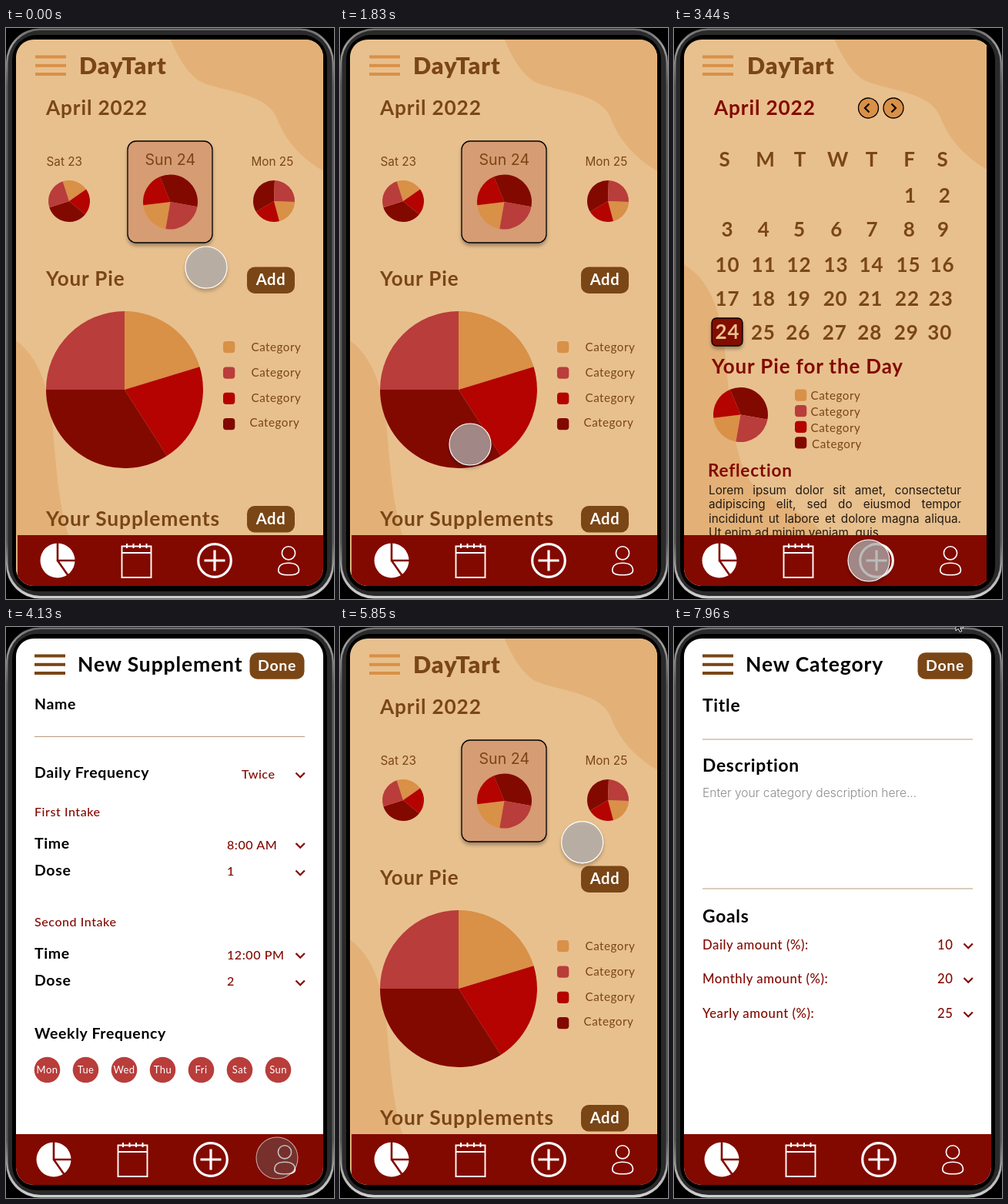
These frames come from a looping animation (426 by 742 pixels, 8000 ms). An HTML page:

```html
<!DOCTYPE html>
<html lang="en">
<head>
<meta charset="utf-8">
<title>Phone prototype</title>
<style>
html, body { margin: 0; width: 100%; height: 100%; overflow: hidden; background: #000; }
svg { display: block; width: 100vw; height: 100vh; }
text { font-family: Nunito, Lato, "Open Sans", sans-serif; letter-spacing: .033em; white-space: pre; }
text.plain, .lorem { font-family: Inter, Roboto, sans-serif; letter-spacing: 0; }
.lorem { font-size: 15.3px; line-height: 18.6px; color: #221a12; white-space: nowrap; }
.lorem div { text-align: justify; text-align-last: justify; }
.lorem div:last-child { text-align-last: left; }
</style>
</head>
<body>
<svg id="stage" viewBox="0 0 426 742" xmlns="http://www.w3.org/2000/svg"></svg>
<script>
const TAN = '#e8c08e', SAND = '#e3b177', CLAY = '#d69c73', BROWN = '#7a4616';
const ORANGE = '#d99047', ROSE = '#b93d3a', RED = '#b40300', DARK = '#820900';
const LOOP = 8000, SCROLL = 318;

const attrs = o => Object.entries(o).map(([k, v]) => `${k}="${v}"`).join(' ');
const rect = (x, y, width, height, fill, rx = 0, more = {}) =>
  `<rect ${attrs({ x, y, width, height, fill, rx, ...more })}/>`;
const circle = (cx, cy, r, fill, more = {}) => `<circle ${attrs({ cx, cy, r, fill, ...more })}/>`;
const line = (d, stroke, width, more = {}) =>
  `<path ${attrs({ d, fill: 'none', stroke, 'stroke-width': width, ...more })}/>`;
const group = (dx, dy, body) => `<g transform="translate(${dx} ${dy})">${body}</g>`;
const text = (x, y, s, size, fill, weight = 700, more = {}) =>
  `<text ${attrs({ x, y, 'font-size': size, fill, 'font-weight': weight, ...more })}>${s}</text>`;
const plain = (x, y, s, size, fill, weight = 400) => text(x, y, s, size, fill, weight, { class: 'plain' });
const centred = (x, y, s, size, fill, weight) => text(x, y, s, size, fill, weight, { 'text-anchor': 'middle' });

// Slices as [colour, end angle], clockwise from the top.
const SLICES = [[ORANGE, 73], [RED, 147.4], [DARK, 270], [ROSE, 360]];
function pie(cx, cy, r, turn = 0) {
  const at = deg => {
    const a = (deg + turn) * Math.PI / 180;
    return `${(cx + r * Math.sin(a)).toFixed(2)} ${(cy - r * Math.cos(a)).toFixed(2)}`;
  };
  let from = 0;
  return SLICES.map(([fill, to]) => {
    const d = `M${cx} ${cy}L${at(from)}A${r} ${r} 0 0 1 ${at(to)}Z`;
    from = to;
    return `<path d="${d}" fill="${fill}"/>`;
  }).join('');
}

const burger = (x, fill) => [35.5, 46.8, 58].map(y => rect(x, y, 40, 4, fill)).join('');
const button = (x, y, w, label, size) =>
  rect(x, y, w, 34.5, BROWN, 10) + centred(x + w / 2, y + 23.8, label, size, '#fff');
const chevron = y => line(`M376.5 ${y - 2.5}l5.7 5.7 5.7 -5.7`, DARK, 2.3);
const rule = y => line(`M37 ${y}H388`, '#b99a7e', 1);

const topBlob = `<path fill="${SAND}" d="M212 10C222 38 240 66 258 72C290 84 340 86 352 118C364 150 388 172 414 187V10Z"/>`;
const sideBlob = `<path fill="${SAND}" d="M-10 301C45 320 56 380 61 440C66 500 72 560 92 590C120 620 175 630 190 665V900H-10Z"/>`;

function nav(dx, x, w) {
  const icons =
    circle(62, 692, 22.5, '#fff') +
    line('M62 668V692H86M62 692L76 712', DARK, 2.6) +
    line('M145.5 673.5H183.5V714H145.5ZM145.5 682H183.5M152 670V676M160.5 670V676M169 670V676M177.5 670V676', '#fff', 1.9) +
    circle(266, 692, 21.3, 'none', { stroke: '#fff', 'stroke-width': 3.2 }) +
    line('M252.5 692H279.5M266 678.5V705.5', '#fff', 3.2) +
    circle(362, 682.3, 8.6, 'none', { stroke: '#fff', 'stroke-width': 1.6 }) +
    line('M348.8 705C348.8 698 354 695.3 362 695.3S375.4 698 375.4 705C375.4 709 371 710.8 362 710.8S348.8 709 348.8 705Z', '#fff', 1.6);
  return rect(x, 659, w, 66, DARK) + group(dx, 0, icons);
}

function legend(x, ys, textXs, drop) {
  return [ORANGE, ROSE, RED, DARK].map((c, i) =>
    rect(x, ys[i], 15.3, 15.3, c, 4) + text(textXs[i], ys[i] + drop[i], 'Category', 15.2, BROWN, 400)).join('');
}

const SUPPLEMENTS = [
  ['Vitamin C', '2 times daily - 8:00 AM and 12:00 PM'],
  ['Fish Oil', '1 times daily - 10:00 AM'],
  ['Hair Skin Nail', '3 times daily - 8:00 AM, 12:00 PM and 4:00 PM']
];
const pill = `<g transform="translate(26.5 29) rotate(-45)" fill="none" stroke="${DARK}" stroke-width="1.2">` +
  `<rect x="-14" y="-6.5" width="28" height="13" rx="6.5"/><path d="M0 -6.5V6.5M-9 -3.5H-3"/></g>`;
const cards = top => SUPPLEMENTS.map(([name, when], i) => group(i < 2 ? 38 : 37, top + i * 103.3,
  rect(0, 0, 350, 81, CLAY, 13) + pill +
  text(52, 36, name, 16.8, DARK) + plain(15, 62, when, 11.1, BROWN, 300))).join('');

function home() {
  const page =
    topBlob + group(1, 94, sideBlob) + burger(38, ORANGE) +
    text(95, 60, 'DayTart', 30.5, BROWN, 900) + text(52, 113, 'April 2022', 26.2, BROWN) +
    rect(158, 147, 110, 132, CLAY, 11, { stroke: '#000', 'stroke-width': 1.3, filter: 'url(#drop)' }) +
    plain(52.5, 178.5, 'Sat 23', 15.3, BROWN) + plain(180.5, 178, 'Sun 24', 19.6, BROWN) +
    plain(318.5, 178.5, 'Mon 25', 15.3, BROWN) +
    pie(82, 225, 27, -18) + pie(213.5, 226, 35.5, 190) + pie(348, 225, 27, 92) +
    text(52, 335, 'Your Pie', 26, BROWN) + button(313, 310.5, 62, 'Add', 20.2) +
    pie(154, 470, 102) +
    legend(282, [407, 440.5, 473.8, 507], [318.5, 318.5, 318.5, 316.5], [13, 12.7, 12.6, 10.8]) +
    text(52, 647, 'Your Supplements', 26.4, BROWN) + button(313, 621, 62, 'Add', 20.2) + cards(672);
  return rect(13, 15, 399, 710, TAN) + `<g id="page">${page}</g>` + nav(5, 15, 397);
}

function calendar() {
  const cols = [69, 116, 162, 210, 256, 304, 348];
  const rows = [227, 271, 317, 360.5, 405];
  let days = '';
  for (let d = 1; d <= 30; d++) {
    const slot = d + 4, col = slot % 7, row = Math.floor(slot / 7);
    const lean = (2 - row) * col * 0.27;
    if (d !== 24) days += centred(cols[col] + lean + 0.4, rows[row], d, 26, BROWN);
  }
  const week = [66, 119, 164, 213, 257, 306, 349];
  const lorem = ['Lorem ipsum dolor sit amet, consectetur', 'adipiscing elit, sed do eiusmod tempor',
    'incididunt ut labore et dolore magna aliqua.', 'Ut enim ad minim veniam, quis'];
  const ring = { stroke: '#000', 'stroke-width': 1.3 };
  return rect(13, 15, 393, 710, TAN) + group(-6, -2, topBlob) + group(7, -1, sideBlob) + burger(37, ORANGE) +
    text(95, 60, 'DayTart', 30.5, BROWN, 900) + text(52, 113, 'April 2022', 26.2, DARK) +
    circle(252.5, 104, 13, ORANGE, ring) + circle(285, 104, 13, ORANGE, ring) +
    line('M253.5 98.5l-5.5 5.5 5.5 5.5M282.5 98.5l5.5 5.5 -5.5 5.5', '#000', 2.2) +
    [...'SMTWTFS'].map((c, i) => centred(week[i], 180, c, 26, BROWN)).join('') + days +
    rect(49, 377, 40, 36, DARK, 6, { ...ring, filter: 'url(#drop)' }) + centred(69.5, 404, 24, 26, TAN) +
    text(49, 449, 'Your Pie for the Day', 26, DARK) + pie(86.5, 502.5, 35.5, 190) +
    legend(157, [469.5, 490, 510.7, 531.3], [177.5, 177.5, 177.5, 179], [13.5, 13.8, 14.1, 14.5]) +
    text(44, 583, 'Reflection', 22.6, DARK) +
    `<foreignObject x="45" y="591.5" width="328" height="80"><div class="lorem">${lorem.map(l => `<div>${l}</div>`).join('')}</div></foreignObject>` +
    rect(406, 15, 6, 710, '#000') + nav(-3, 13, 393);
}

const form = (title, body) => rect(13, 15, 399, 710, '#fff') + burger(37, BROWN) +
  text(93, 58, title, 26.5, '#000') + button(316.5, 33.2, 71, 'Done', 19.5) + body + nav(0, 13, 399);

function newSupplement() {
  const head = (y, s) => text(37, y, s, 19.5, '#000');
  const note = (x, y, s) => text(x, y, s, 16.1, DARK, 500);
  const intake = (y, name, time, dose) => note(37, y, name) +
    head(y + 42, 'Time') + note(287, y + 43, time) + chevron(y + 38) +
    head(y + 77.5, 'Dose') + note(287, y + 77.5, dose) + chevron(y + 73.5);
  const days = ['Mon', 'Tue', 'Wed', 'Thu', 'Fri', 'Sat', 'Sun'].map((d, i) =>
    circle(53.5 + 50 * i, 575.5, 16.8, ROSE) + centred(53.5 + 50 * i, 580.3, d, 13, '#fff', 400)).join('');
  return form('New Supplement', head(107, 'Name') + rule(142.5) +
    head(196, 'Daily Frequency') + note(306, 197, 'Twice') + chevron(192) +
    intake(245.5, 'First Intake', '8:00 AM', 1) + intake(388.5, 'Second Intake', '12:00 PM', 2) +
    head(534.5, 'Weekly Frequency') + days);
}

function newCategory() {
  const head = (y, s) => text(37, y, s, 22.8, '#000');
  const goals = [['Daily', 10], ['Monthly', 20], ['Yearly', 25]].map(([name, n], i) => {
    const y = 418.5 + 44.5 * i;
    return text(37, y, name + ' amount (%):', 16.7, DARK, 500) + text(342, y, n, 16.7, DARK, 500) + chevron(y - 4.5);
  }).join('');
  return form('New Category', head(110, 'Title') + rule(146) + head(188, 'Description') +
    plain(37, 221, 'Enter your category description here...', 15.6, '#8c8c8c', 300) +
    rule(340) + head(384, 'Goals') + goals);
}

const list = () => rect(13, 15, 399, 710, TAN) + burger(37, ORANGE) +
  text(94, 58, 'Supplement', 26.4, BROWN) + cards(86.5) + nav(0, 13, 399);

const screens = { home, calendar, newSupplement, list, newCategory };
const stage = document.getElementById('stage');
stage.innerHTML = `<defs>
  <clipPath id="glass"><rect x="13" y="15" width="399" height="710" rx="23"/></clipPath>
  <filter id="drop" x="-30%" y="-30%" width="160%" height="170%"><feDropShadow dx="0" dy="3.5" stdDeviation="2" flood-opacity=".3"/></filter>
  <linearGradient id="rim" x2="0" y2="1"><stop offset="0" stop-color="#6a6a6a"/><stop offset=".03" stop-color="#a0a0a0"/>
  <stop offset=".1" stop-color="#5a5a5a"/><stop offset=".9" stop-color="#5a5a5a"/><stop offset=".96" stop-color="#b4b4b4"/>
  <stop offset="1" stop-color="#d0d0d0"/></linearGradient></defs>` +
  rect(0, 0, 426, 742, '#000') + rect(0, 0.5, 426, 741, 'url(#rim)', 44) +
  rect(2.5, 3, 421, 735, '#2a2a2a', 42) +
  rect(8, 9, 409, 723, '#000', 32) +
  '<g clip-path="url(#glass)">' +
  Object.entries(screens).map(([id, draw]) => `<g id="${id}">${draw()}</g>`).join('') + '</g>' +
  '<g id="cursor" filter="url(#drop)"><circle r="27" stroke-width="1.1"/></g>' +
  '<path id="arrow" d="M366 -10V5l3.2 -3 2.2 4.5 2.4 -1.2 -2.2 -4.3h4.6Z" fill="#000" stroke="#fff" stroke-width=".9"/>';

const el = id => document.getElementById(id);
const cursor = el('cursor'), dot = cursor.firstChild;

// Start, end, number of jumps, destination.
const MOVES = [
  [1830, 1830, 1, 169, 541], [1960, 2100, 2, 168, 691], [2900, 3440, 5, 253, 692],
  [4010, 4130, 2, 352, 690], [4690, 4990, 3, 79, 691], [5570, 5570, 1, 302, 253],
  [5850, 6150, 3, 340, 333], [6300, 6450, 2, 345, 326], [7840, 7840, 1, 347, 150]
];
const PRESSES = [[2230, 2650], [3600, 3860], [4130, 4380], [5140, 5290], [7140, 7430]];
const VIEWS = [[0, 'home'], [2510, 'calendar'], [3730, 'newSupplement'], [4380, 'list'], [5290, 'home'], [7290, 'newCategory']];

function stepped(t, start, end, n) {
  if (t < start) return 0;
  if (t >= end) return 1;
  return (Math.floor((t - start) / (end - start) * (n - 1)) + 1) / n;
}

function render(t) {
  const view = VIEWS.filter(([from]) => t >= from).pop()[1];
  for (const id in screens) el(id).style.display = id === view ? '' : 'none';

  const scroll = SCROLL * (stepped(t, 560, 680, 2) - stepped(t, 1400, 1550, 2));
  el('page').setAttribute('transform', `translate(0 ${-scroll})`);

  let x = 260, y = 311;
  for (const [start, end, n, tx, ty] of MOVES) {
    const k = stepped(t, start, end, n);
    x += (tx - x) * k;
    y += (ty - y) * k;
  }
  const pressed = PRESSES.some(([a, b]) => t >= a && t < b);
  const away = t >= 7960;
  cursor.setAttribute('transform', `translate(${x} ${y})`);
  cursor.setAttribute('filter', pressed ? 'none' : 'url(#drop)');
  cursor.style.display = away ? 'none' : '';
  dot.setAttribute('fill', pressed ? 'rgba(102,102,102,.42)' : 'rgba(176,175,175,.73)');
  dot.setAttribute('stroke', pressed ? 'rgba(255,255,255,.6)' : '#fff');
  el('arrow').style.display = away ? '' : 'none';
}

const began = performance.now();
function tick() {
  render((performance.now() - began) % LOOP);
  requestAnimationFrame(tick);
}
tick();
</script>
</body>
</html>
```
